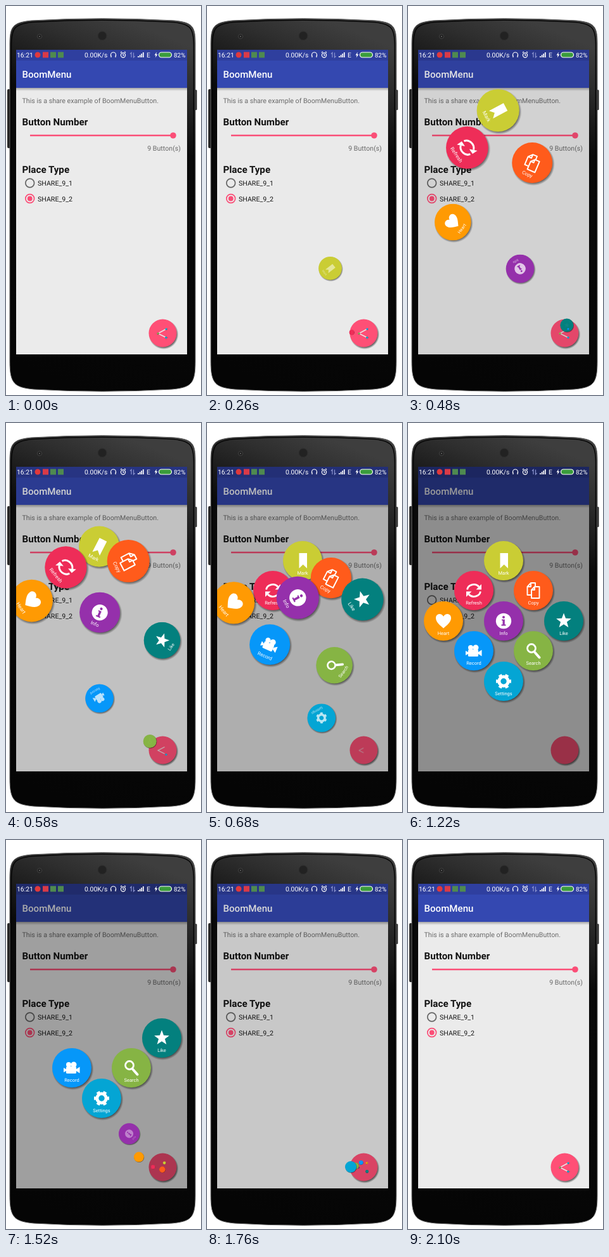
Recreate the animation shown at these times as an HTML page. Size 308x613 px, loop 2.14 s.

```html
<!DOCTYPE html>
<html lang="en">
<head>
<meta charset="utf-8">
<title>BoomMenu</title>
<style>
  @property --p { syntax: "<number>"; inherits: true; initial-value: 0; }
  @property --r { syntax: "<number>"; inherits: true; initial-value: 0; }

  html, body { margin: 0; width: 100%; height: 100%; overflow: hidden; background: #fff; }
  svg { display: block; width: 100%; height: 100%; }
  text { font-family: Roboto, "Open Sans", sans-serif; text-rendering: geometricPrecision; }

  .status { font-size: 10.4px; fill: #fff; }
  .head { font-size: 15.2px; font-weight: 700; fill: #131313; }
  .body { font-size: 10.66px; fill: #6a6a6a; }
  .option { font-size: 10.6px; fill: #161616; }

  /* Each button runs the same loop, 50 ms after the one before it. */
  .button {
    --k: calc(.05 + .95 * var(--p));
    transform:
      translate(calc((var(--x) + var(--dx) * var(--p)) * 1px),
                calc((var(--y) + var(--dy) * var(--p) * var(--p)) * 1px))
      scale(var(--k));
    animation: move 2140ms calc(var(--i) * 50ms) infinite backwards,
               spin 2140ms calc(var(--i) * 50ms) infinite backwards;
  }
  .face { opacity: calc((var(--p) - .28) * 1.7); transform: rotate(calc(var(--r) * 1deg)); }
  .face text { font-size: 7.5px; text-anchor: middle; fill: #fff; }

  @keyframes move {
    0% { --p: 0; }
    9.5327% { --p: 0; animation-timing-function: cubic-bezier(.175, .885, .32, 1.275); }
    29.1589% { --p: 1; }
    60.4673% { --p: 1; animation-timing-function: cubic-bezier(.075, .82, .165, 1); }
    79.1589%, 100% { --p: 0; }
  }
  @keyframes spin {
    0% { --r: 0; }
    9.5327% { --r: 0; animation-timing-function: cubic-bezier(.175, .885, .32, 1.275); }
    29.1589% { --r: 720; }
    60.4673% { --r: 720; animation-timing-function: linear; }
    79.1589%, 100% { --r: 0; }
  }

  #dim { animation: dim 2140ms infinite; }
  @keyframes dim {
    0% { opacity: 0; }
    9.5327% { opacity: 0; animation-timing-function: cubic-bezier(.364, 0, .636, 1); }
    46.9159% { opacity: .4; }
    60.4673% { opacity: .4; animation-timing-function: cubic-bezier(.364, 0, .636, 1); }
    97.8505%, 100% { opacity: 0; }
  }

  #lines { animation: lines 2140ms infinite linear; }
  @keyframes lines {
    0%, 23.5514% { transform: scale(1); }
    42.243%, 79.1589% { transform: scale(0); }
    97.8505%, 100% { transform: scale(1); }
  }
</style>
</head>
<body>
<svg viewBox="0 0 308 613" xmlns="http://www.w3.org/2000/svg">
  <defs>
    <linearGradient id="shell" x1=".6" y1="0" x2=".4" y2="1">
      <stop offset="0" stop-color="#3e3e3e"/>
      <stop offset=".1" stop-color="#2e2e2e"/>
      <stop offset=".28" stop-color="#0a0a0a"/>
      <stop offset="1" stop-color="#050505"/>
    </linearGradient>
    <linearGradient id="drop" x1="0" y1="0" x2="0" y2="1">
      <stop offset="0" stop-color="#000" stop-opacity=".3"/>
      <stop offset="1" stop-color="#000" stop-opacity="0"/>
    </linearGradient>
    <radialGradient id="shade">
      <stop offset=".86" stop-color="#000" stop-opacity=".55"/>
      <stop offset="1" stop-color="#000" stop-opacity="0"/>
    </radialGradient>
    <clipPath id="screen"><rect x="16" y="69" width="270" height="480"/></clipPath>
  </defs>

  <!-- phone -->
  <rect x="2" y="131" width="5" height="93" rx="2" fill="#252525"/>
  <rect x="298" y="132" width="3.500" height="32" rx="1.500" fill="#252525"/>
  <path d="M6 60C6 32 11 26 40 23Q152 16.500 266 23C295 26 299 32 299 60V560C299 595 293 601 262 604Q152 610.500 44 604C13 601 6 595 6 560Z"
        fill="url(#shell)" stroke="#5c5c5c"/>
  <path d="M8.500 62C8.500 35 13.500 28.500 41 25.500Q152 19 265 25.500C291.500 28.500 296.500 35 296.500 62V558C296.500 592 290.500 598 261 601.500Q152 607.500 45 601.500C14.500 598 8.500 592 8.500 558Z"
        fill="none" stroke="#050505" stroke-width="1.500"/>
  <circle cx="152" cy="47" r="7" fill="#222" stroke="#303030"/>
  <circle cx="53" cy="48" r="3.500" fill="#1c1c1c" stroke="#444"/>
  <circle cx="53" cy="48" r="1.200" fill="#555"/>

  <g clip-path="url(#screen)">
    <!-- page -->
    <rect x="16" y="69" width="270" height="480" fill="#ebebeb"/>
    <rect x="16" y="129" width="270" height="5" fill="url(#drop)"/>
    <rect x="16" y="86" width="270" height="43" fill="#3448b1"/>
    <rect x="16" y="69" width="270" height="17" fill="#2f3f9f"/>
    <text x="25.500" y="113" font-size="15.100" font-weight="500" fill="#fff">BoomMenu</text>
    <text class="body" x="25.500" y="153">This is a share example of BoomMenuButton.</text>
    <text class="head" x="25.500" y="188">Button Number</text>
    <path d="M38 204H264" stroke="#fb4e77" stroke-width="2.600"/>
    <circle cx="264" cy="204" r="4.800" fill="#fb4e77"/>
    <text class="body" x="276" y="228" text-anchor="end">9 Button(s)</text>
    <text class="head" x="25.500" y="263">Place Type</text>
    <g fill="none" stroke-width="1.700">
      <circle cx="37.700" cy="279" r="6.900" stroke="#666"/>
      <circle cx="37.700" cy="303.500" r="6.900" stroke="#fb4e77"/>
    </g>
    <circle cx="37.700" cy="303.500" r="3.900" fill="#fb4e77"/>
    <text class="option" x="50" y="283">SHARE_9_1</text>
    <text class="option" x="50" y="307.500">SHARE_9_2</text>

    <circle cx="249" cy="517.500" r="23.500" fill="url(#shade)"/>
    <circle cx="247.500" cy="515.500" r="22" fill="#ff4f76"/>
    <g transform="translate(240 516)">
      <path id="lines" d="M13 -7L0 0L13 6.500" fill="none" stroke="#e8e8e8" stroke-width="1.500"/>
    </g>

    <rect id="dim" x="16" y="69" width="270" height="480" opacity="0"/>

    <!-- status bar -->
    <g class="status">
      <text x="17" y="81">16:21</text>
      <text x="124" y="81">0.00K/s</text>
      <text x="222" y="81">E</text>
      <text x="265" y="81" font-size="10">82%</text>
    </g>
    <circle cx="50" cy="77" r="4.500" fill="#e0393c"/>
    <rect x="58" y="72.500" width="9" height="9" fill="#d93a48"/>
    <rect x="70" y="72.500" width="9" height="9" fill="#4f8a50"/>
    <rect x="82" y="72.500" width="9" height="9" fill="#4f8a50"/>
    <g fill="none" stroke="#fff" stroke-width="1.200">
      <path d="M165.500 79V77a4 4 0 0 1 8 0V79M166 78v3M173 78v3"/>
      <circle cx="185" cy="77.500" r="3.600"/>
      <path d="M185 75.500v2.200h1.800M181 73.500l1.800 -1.500M189 73.500l-1.800 -1.500"/>
      <path d="M198 81V73.500l-2 2M201.500 73.500V81l2 -2" stroke="#8a93cf"/>
      <path d="M209 81v-2M211.600 81v-4M214.200 81v-6M216.800 81v-8" stroke-width="1.700"/>
      <rect x="241.500" y="73" width="20" height="8" rx="4" fill="#3b9c3c"/>
    </g>
    <path d="M238 72.500l-3.500 5h2.200l-1 4 3.800 -5.200h-2.300z" fill="#fff"/>

    <g id="menu"></g>
  </g>
</svg>

<script>
  const star = Array.from({ length: 10 }, (_, n) => {
    const a = n * Math.PI / 5, r = n % 2 ? 5.2 : 12.5;
    return `${(r * Math.sin(a)).toFixed(2)},${(-r * Math.cos(a)).toFixed(2)}`;
  }).join(" ");

  const arrow = '<path d="M-10.500 -1.500A10.500 9.500 0 0 1 8 -6" fill="none" stroke="#fff" stroke-width="2.800"/><path d="M12 -10V-1.500H3.500Z"/>';

  const icons = {
    Mark: '<path d="M-5.500 -12H7V12L.7 6L-5.500 12Z"/>',
    Refresh: arrow + `<g transform="rotate(180)">${arrow}</g>`,
    Copy: '<g fill="currentColor" stroke="#fff" stroke-width="1.900" stroke-linejoin="round">' +
      '<path d="M-4 -12H3V7H-9.500V-6ZM-4 -12V-6H-9.500"/><path d="M2 -6H9.500V12H-3V-1ZM2 -6V-1H-3"/></g>',
    Heart: '<path d="M0 11.500C-5 7 -12 2 -12 -4.500C-12 -12 -3 -13 0 -7C3 -13 12 -12 12 -4.500C12 2 5 7 0 11.500Z"/>',
    Info: '<circle r="12.200"/><g fill="currentColor"><circle cy="-6" r="2"/><path d="M-3 -2.500H1.800V5.500H3.500V7.500H-3.500V5.500H-1.500V-.7H-3Z"/></g>',
    Like: `<polygon points="${star}"/>`,
    Record: '<circle cx="-5" cy="-5" r="4"/><circle cx="3" cy="-5" r="4.500"/><rect x="-9" y="-2" width="16" height="11" rx="1.500"/><path d="M7 2L12.500 -1.500V8.500L7 5ZM-9 2L-13 0V7L-9 5Z"/>',
    Search: '<circle cx="-3" cy="-4" r="6.500" fill="none" stroke="#fff" stroke-width="2.800"/><path d="M2 2L9.500 10.500" stroke="#fff" stroke-width="4" stroke-linecap="round"/>',
    Settings: '<g fill="none" stroke="#fff"><circle r="7.200" stroke-width="5"/><circle r="10" stroke-width="4" pathLength="12" stroke-dasharray="1 1" stroke-dashoffset=".5"/></g>'
  };

  const colors = ["#cacd34", "#ee2d58", "#ff5b1b", "#ff9a03", "#9530ab", "#03807e", "#0697f9", "#86b444", "#04a5d4"];
  const places = [[151, 217], [104, 264], [198, 264], [56, 312], [151, 312], [246, 312], [104, 359], [198, 359], [151, 407]];
  const dots = [[253, 509], [240, 516], [253, 522.5]];

  document.getElementById("menu").innerHTML = Object.entries(icons).map(([name, icon], i) => {
    const [x, y] = dots[i % 3], [tx, ty] = places[i];
    return `<g class="button" style="--i:${i};--x:${x};--y:${y};--dx:${tx - x};--dy:${ty - y};color:${colors[i]}">
      <circle cx="1.500" cy="2" r="33" fill="url(#shade)"/>
      <circle r="31" fill="currentColor"/>
      <g class="face" fill="#fff">${icon}<text y="21.500">${name}</text></g>
    </g>`;
  }).join("");
</script>
</body>
</html>
```
